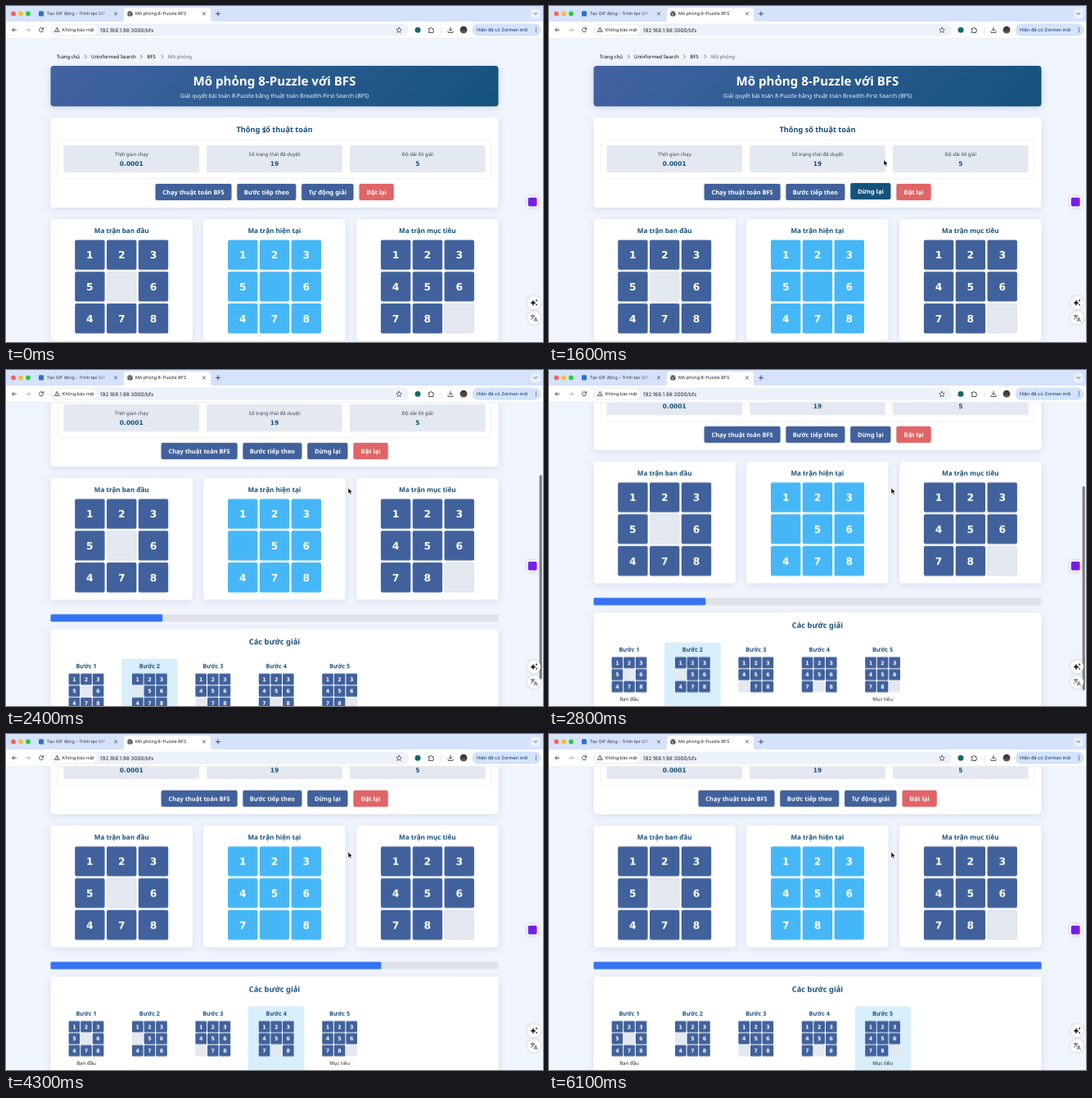
Animation of 656x410 px, one loop 6.2 s. Source, as an HTML page:

```html
<!DOCTYPE html>
<html lang="vi">
<head>
<meta charset="utf-8">
<title>8-Puzzle BFS</title>
<style>
html, body { margin: 0; width: 100%; height: 100%; overflow: hidden; background: #f0f4fc; }
svg { display: block; width: 656px; height: 410px; text-rendering: geometricPrecision; font-family: "Noto Sans", sans-serif; }
.ui { font-family: Inter, sans-serif; }
.num { font-family: "DejaVu Sans", sans-serif; font-weight: 700; }
.b { font-weight: 700; }
.m { text-anchor: middle; }
.line { fill: none; stroke: #3c4043; stroke-width: .9; stroke-linecap: round; stroke-linejoin: round; }
.card { fill: #fff; filter: drop-shadow(0 2px 4px rgba(40, 70, 130, .13)); }
.soft { fill: #fff; filter: drop-shadow(0 .6px 1px rgba(40, 60, 100, .16)); }
.btn { fill: #41619c; }
.btn.red { fill: #e16466; }
.btn rect { filter: drop-shadow(0 .7px 1px rgba(30, 50, 90, .18)); }
.btn text { fill: #fff; }

.page, .thumb, .hot, .pick, .fill, .cur, .rowA, .rowB, .ibeam, .arrow, .hand, .s { animation: 6.2s linear infinite; }
.rowA, .rowB, .ibeam, .arrow, .hand, .s, .pick { animation-timing-function: step-end; }
.page { animation-name: page; }
.thumb { animation-name: thumb; }
.hot { animation-name: hot; }
.pick { animation-name: pick; }
.fill { animation-name: fill; animation-timing-function: ease; }
.cur { animation-name: cur; }
.rowA { animation-name: rowA; }
.rowB { animation-name: rowB; }
.ibeam { animation-name: ibeam; }
.arrow { animation-name: arrow; }
.hand { animation-name: hand; }
.s1 { animation-name: s1; }
.s2 { animation-name: s2; }
.s3 { animation-name: s3; }
.s4 { animation-name: s4; }
.s5 { animation-name: s5; }

@keyframes page {
  0%, 34.2% { transform: translateY(0); }
  35.484% { transform: translateY(-23px); }
  37.097% { transform: translateY(-85px); }
  38.71% { transform: translateY(-128px); }
  40.32% { transform: translateY(-142px); }
  42.74%, 100% { transform: translateY(-148.3px); }
}
@keyframes thumb {
  0%, 34.2% { transform: translateY(0); opacity: 0; }
  35.484% { transform: translateY(15.5px); opacity: 1; }
  37.097% { transform: translateY(57.5px); }
  38.71% { transform: translateY(86.5px); }
  40.32% { transform: translateY(96px); }
  42.74% { transform: translateY(100.3px); }
  51% { transform: translateY(100.3px); opacity: 1; }
  55%, 100% { transform: translateY(100.3px); opacity: 0; }
}
@keyframes hot {
  0%, 8.7% { transform: none; fill: #41619c; }
  12%, 25.81% { transform: translateY(-1px); fill: #14527c; }
  29%, 100% { transform: none; fill: #41619c; }
}
@keyframes pick {
  0% { transform: none; }
  33.581% { transform: translateX(77.4px); }
  49.71% { transform: translateX(154.8px); }
  65.839% { transform: translateX(232.2px); }
  81.968%, 100% { transform: translateX(309.6px); }
}
@keyframes fill {
  0%, 33.581% { width: 0; }
  38.419%, 49.71% { width: 136.75px; }
  54.548%, 65.839% { width: 273.5px; }
  70.677%, 81.968% { width: 410.25px; }
  86.806%, 100% { width: 547px; }
}
@keyframes cur {
  0%, 1% { transform: translate(316px, 151px); animation-timing-function: ease-in-out; }
  11.3%, 24.6% { transform: translate(393px, 227px); }
  25.806% { transform: translate(409px, 188px); animation-timing-function: ease-out; }
  30%, 100% { transform: translate(418px, 144px); }
}
@keyframes rowA { 0%, 98.097%, 100% { opacity: 1; } 17.45% { opacity: 0; } }
@keyframes rowB { 0%, 98.097%, 100% { opacity: 0; } 17.45% { opacity: 1; } }
@keyframes ibeam { 0% { opacity: 1; } 1.6%, 100% { opacity: 0; } }
@keyframes arrow { 0%, 9.4% { opacity: 0; } 1.6%, 25.1%, 100% { opacity: 1; } }
@keyframes hand { 0%, 25.1%, 100% { opacity: 0; } 9.4% { opacity: 1; } }
@keyframes s1 { 0% { opacity: 1; } 33.581%, 100% { opacity: 0; } }
@keyframes s2 { 0%, 49.71%, 100% { opacity: 0; } 33.581% { opacity: 1; } }
@keyframes s3 { 0%, 65.839%, 100% { opacity: 0; } 49.71% { opacity: 1; } }
@keyframes s4 { 0%, 81.968%, 100% { opacity: 0; } 65.839% { opacity: 1; } }
@keyframes s5 { 0% { opacity: 0; } 81.968%, 100% { opacity: 1; } }
</style>
</head>
<body>
<svg id="stage" viewBox="0 0 656 410"></svg>
<script>
const NAVY = '#41619c', INK = '#14507c', SKY = '#45b7f6', PALE = '#e4e8f0';
const steps = ['1235 6478', '123 56478', '123456 78', '1234567 8', '12345678 '];

const rect = (x, y, w, h, r, fill, more = '') =>
  `<rect x="${x}" y="${y}" width="${w}" height="${h}" rx="${r}" ${fill ? `fill="${fill}"` : ''} ${more}/>`;
const text = (x, y, size, str, cls = '', fill = '') =>
  `<text x="${x}" y="${y}" font-size="${size}" class="${cls}" ${fill ? `fill="${fill}"` : ''}>${str}</text>`;
const line = (d, more = '') => `<path class="line" d="${d}" ${more}/>`;
const dot = (x, y, r, fill, more = '') => `<circle cx="${x}" cy="${y}" r="${r}" fill="${fill}" ${more}/>`;
const group = (cls, body) => `<g class="${cls}">${body}</g>`;

function board(state, x, y, color) {
  return [...state].map((n, i) => {
    const tx = x + i % 3 * 38.8, ty = y + Math.floor(i / 3) * 38.8;
    if (n !== ' ') {
      return rect(tx, ty, 36.4, 36.4, 2, color) + text(tx + 18.2, ty + 22.6, 12.3, n, 'num m', '#fff');
    }
    const edge = color === SKY
      ? 'stroke="#79a9cf" stroke-width=".5"'
      : 'stroke="#c3c7d2" stroke-width=".6" stroke-dasharray="1.6 1"';
    return rect(tx + .3, ty + .3, 35.8, 35.8, 2, color === SKY ? SKY : PALE, edge);
  }).join('');
}

function miniBoard(state, x, y) {
  return [...state].map((n, i) => {
    const tx = x + i % 3 * 14.6, ty = y + Math.floor(i / 3) * 14.6;
    return rect(tx, ty, 13.6, 13.6, 1, n === ' ' ? PALE : NAVY) +
      (n === ' ' ? '' : text(tx + 6.8, ty + 9.2, 6.4, n, 'num m', '#fff'));
  }).join('');
}

const button = (x, w, label, cls = '') =>
  group('btn ' + cls, rect(x, 217, w, 20, 2) + text(x + w / 2, 229.8, 7.45, label, 'b m'));

const buttons = (x, toggle, w) =>
  button(x, 93, 'Chạy thuật toán BFS') + button(x + 99.8, 72, 'Bước tiếp theo') +
  button(x + 178.6, w, toggle, 'hot') + button(x + 185.6 + w, 42.2, 'Đặt lại', 'red');

const stat = (x, label, value) =>
  rect(x, 170, 165.6, 33.3, 2, PALE) + text(x + 82.8, 183, 6.05, label, 'm', '#3a4250') +
  text(x + 82.8, 195, 7.5, value, 'num m', INK);

const boardCard = (x, title, body) =>
  rect(x, 260, 173.4, 148.4, 4, '', 'class="card"') +
  text(x + 86.7, 276.6, 8.1, title, 'b m', INK) + body;

function page() {
  const crumbs = text(62, 63.7, 6, 'Trang chủ') + text(104, 63.7, 6, 'Uninformed Search') +
    text(172.6, 63.7, 6, 'BFS') + text(198, 63.7, 6, 'Mô phỏng', '', '#5f6875') +
    [96.5, 164.5, 190].map(x => line(`M${x} 59.6l2 2-2 2`, 'style="stroke-width:.7"')).join('');
  const header = rect(54.5, 73, 547, 49.5, 4, 'url(#head)', 'style="filter:drop-shadow(0 2px 4px rgba(40,70,130,.16))"') +
    text(328, 97, 15.1, 'Mô phỏng 8-Puzzle với BFS', 'b m', '#fff') +
    text(328, 111.6, 6.95, 'Giải quyết bài toán 8-Puzzle bằng thuật toán Breadth-First Search (BFS)', 'm', '#f1f5fb');
  const stats = rect(54.5, 136, 547, 110, 4, '', 'class="card"') +
    text(328, 154.4, 9.2, 'Thông số thuật toán', 'b m', INK) +
    rect(64, 164, 528, 46.3, 3, '', 'class="soft"') +
    stat(70.5, 'Thời gian chạy', '0.0001') + stat(245.2, 'Số trạng thái đã duyệt', '19') +
    stat(420, 'Độ dài lời giải', '5') +
    group('rowA', buttons(182.5, 'Tự động giải', 63.4)) +
    group('rowB', buttons(189.6, 'Dừng lại', 49.2));
  const boards =
    boardCard(54.5, 'Ma trận ban đầu', board(steps[0], 84.2, 285.4, NAVY)) +
    boardCard(241.2, 'Ma trận hiện tại', steps.map((s, i) => group(`s s${i + 1}`, board(s, 271, 285.4, SKY))).join('')) +
    boardCard(428.1, 'Ma trận mục tiêu', board(steps[4], 457.9, 285.4, NAVY));
  const progress = rect(54.5, 426.3, 547, 9, 2, '#dfe2e7') +
    rect(54.5, 426.3, 0, 9, 1.5, '#3573f2', 'class="fill"');
  const list = rect(54.5, 444.3, 547, 132, 4, '', 'class="card"') +
    text(328, 463, 9.3, 'Các bước giải', 'b m', INK) +
    rect(64, 480.6, 68.4, 82, 2, '#d8eefb', 'class="pick"') +
    steps.map((s, i) => {
      const x = 98 + 77.4 * i, note = { 0: 'Ban đầu', 4: 'Mục tiêu' }[i];
      return text(x, 492.3, 7.3, `Bước ${i + 1}`, 'b m', '#1d4f84') + miniBoard(s, x - 21.4, 498.6) +
        (note ? text(x, 552.2, 6.1, note, 'm', '#222') : '');
    }).join('');
  return group('page', crumbs + header + stats + boards + progress + list);
}

function browser() {
  const cross = x => line(`M${x - 1.6} 7.8l3.2 3.2m0-3.2l-3.2 3.2`, 'style="stroke-width:.8"');
  const tabs = rect(0, 0, 656, 20, 0, '#d5e2fb') +
    dot(9, 9.4, 2.8, '#ff5f57') + dot(18, 9.4, 2.8, '#febc2e') + dot(27, 9.4, 2.8, '#28c840') +
    rect(40, 6.2, 6, 6.4, 1, '#2f6fd0') +
    text(50, 11.4, 5.35, 'Tạo GIF động - Trình tạo GIF -', '', 'url(#fade)') + cross(134) +
    '<path d="M140 19.5q4 0 4-4V6q0-4 4-4h98q4 0 4 4v9.500q0 4 4 4z" fill="#fff"/>' +
    dot(151.500, 9.4, 3.2, '#4b4f54') + line('M149.600 8.400l2 1.200-.6 2m1.600-4.400l1.400 1.400', 'style="stroke:#fff;stroke-width:.7"') +
    text(158, 11.4, 5.45, 'Mô phỏng 8-Puzzle BFS', '', '#1f1f1f') + cross(242) +
    line('M256.500 9.400h5m-2.500-2.500v5') +
    rect(641, 3.800, 11.500, 11.500, 3, '#eaf1fd') + line('M645 8.600l1.800 1.800 1.800-1.800');
  const bar = rect(0, 19, 656, 20.6, 0, '#fff') + rect(0, 39.4, 656, .5, 0, '#dde3ec') +
    line('M12.600 29.200h-5m2.300-2.300l-2.300 2.300 2.300 2.300') +
    line('M24.600 29.200h5m-2.300-2.300l2.300 2.300-2.300 2.300', 'style="stroke:#a9adb3"') +
    line('M45.300 27.800a2.600 2.600 0 1 0 .3 2m.1-3.400v1.800h-1.800') +
    rect(54, 21.400, 438, 15.600, 7.800, '#edf2fa') + rect(56, 23, 55, 12.400, 6.200, '#fff') +
    line('M62.500 26.400l2.900 5h-5.800z', 'style="stroke-width:.8"') + line('M62.500 28.400v1.200m0 .9v.1', 'style="stroke-width:.6"') +
    text(68.800, 31.200, 5.4, 'Không bảo mật', '', '#1f1f1f') +
    text(115, 31.600, 6.4, '192.168.1.98:3000/bfs', '', '#202124') +
    line('M480 26.100l1 2.100 2.300.3-1.700 1.600.4 2.300-2-1.100-2 1.100.4-2.300-1.700-1.600 2.300-.3z', 'style="stroke-width:.7"') +
    dot(503, 29.200, 3.500, '#126c68') +
    line('M516.500 27.400h1.600a1 1 0 0 1 2 0h1.600v1.600a1 1 0 0 1 0 2v1.500h-5.200v-1.500a1 1 0 0 0 0-2z') +
    rect(531.500, 25, .7, 8.500, 0, '#c8d8f2') +
    line('M543 26v4m-1.800-1.600l1.800 1.800 1.800-1.800m-4.800 2.500v1.500h6v-1.500') +
    dot(559, 29.200, 4.400, 'url(#face)') +
    rect(569.500, 21.600, 84, 15.200, 7.600, '#d3e3fd') +
    text(575, 31.300, 5.65, 'Hiện đã có Zormen mới', '', '#0b2f5f') +
    [26.800, 29.200, 31.600].map(y => dot(647.500, y, .65, '#0b2f5f')).join('');
  return group('ui', tabs + bar);
}

function floating() {
  const shade = 'style="filter:drop-shadow(0 .5px 1.500px rgba(0,0,0,.22))"';
  return rect(651.6, 41.5, 3.2, 249, 1.6, '#7b7d81', 'class="thumb"') +
    rect(636, 232, 14.500, 14.500, 3, '#fbf9ff', shade) + rect(637.800, 233.800, 10.800, 10.800, 2, '#7420ea') +
    dot(645, 362, 8, '#fff', shade) + dot(645, 380.600, 8, '#fff', shade) +
    '<path d="M644 358.500q.6 3 3.500 3.700-2.900.700-3.500 3.700-.6-3-3.500-3.700 2.900-.700 3.500-3.700zM648 357.500q.3 1.500 1.600 1.800-1.300.3-1.600 1.800-.3-1.500-1.600-1.800 1.300-.3 1.600-1.800zM648 363q.2 1.200 1.300 1.500-1.100.3-1.300 1.500-.2-1.200-1.300-1.500 1.100-.3 1.300-1.500z" fill="#222"/>' +
    line('M641 378h5m-2.500-1v1m1.700 0q-.7 2.800-4 4.600m.8-4.600q.8 2.200 2.600 3.400m.6 3.600l2-5 2 5m-3.300-1.700h2.600', 'style="stroke-width:.75"');
}

const cursor = () => group('cur',
  group('ibeam', line('M-1-3.500q1 0 1 .8v5.400q0 .8-1 .8m2-7q-1 0-1 .8m0 5.400q0 .8 1 .8', 'style="stroke:#333;stroke-width:.6"')) +
  group('arrow', '<path d="M0 0V7L1.600 5.500 2.700 8 3.900 7.500 2.800 5.100H5Z" fill="#000" stroke="#fff" stroke-width=".5"/>') +
  group('hand', '<path d="M-.6 0q.7-.7 1.300 0v2.600q2.800.2 3 1.200v1.800l-.8 2.200h-3.500l-2-3q0-1.100 1-.6l1 .8z" fill="#000" stroke="#fff" stroke-width=".5"/>'));

const defs = `<defs>
  <linearGradient id="head" gradientUnits="userSpaceOnUse" x1="179" y1="-51" x2="477" y2="247">
    <stop stop-color="#4363a2"/><stop offset="1" stop-color="#13527d"/></linearGradient>
  <linearGradient id="fade" gradientUnits="userSpaceOnUse" x1="112" y1="0" x2="126" y2="0">
    <stop stop-color="#2c3440"/><stop offset="1" stop-color="#2c3440" stop-opacity="0"/></linearGradient>
  <linearGradient id="face" x2="0" y2="1"><stop stop-color="#2b2a2c"/><stop offset="1" stop-color="#6a5a54"/></linearGradient>
</defs>`;

document.getElementById('stage').innerHTML =
  defs + rect(0, 0, 656, 410, 0, '#f0f4fc') + page() + browser() + floating() + cursor();
</script>
</body>
</html>
```
